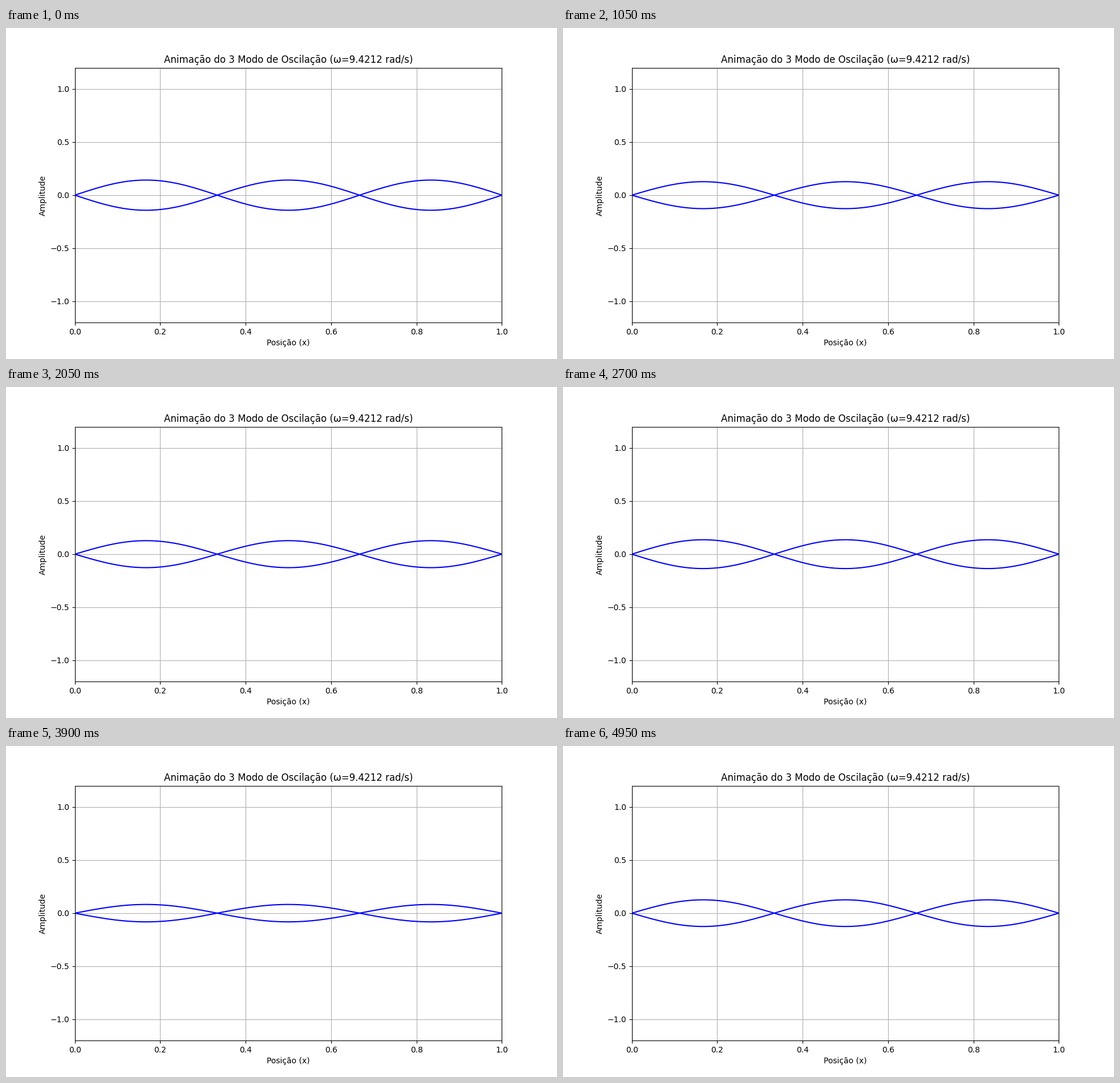
A matplotlib script for the animation above (5000 ms loop, 966 by 580 pixels).

```python
import numpy as np
import matplotlib.pyplot as plt
from matplotlib.animation import FuncAnimation

WIDTH, HEIGHT, DPI = 966, 580, 100
FRAMES, INTERVAL = 100, 50

# Discretised string with fixed ends
MODE = 3
POINTS = 100
SEGMENTS = POINTS - 1

x = np.linspace(0, 1, POINTS)
omega = 2 * SEGMENTS * np.sin(MODE * np.pi / (2 * SEGMENTS))
shape = np.sqrt(2 / SEGMENTS) * np.sin(MODE * np.pi * x)  # unit-norm eigenvector

fig, ax = plt.subplots(figsize=(WIDTH / DPI, HEIGHT / DPI), dpi=DPI)
ax.set_xlim(0, 1)
ax.set_ylim(-1.2, 1.2)
ax.set_title(f"Animação do {MODE} Modo de Oscilação (ω={omega:.4f} rad/s)")
ax.set_xlabel("Posição (x)")
ax.set_ylabel("Amplitude")
ax.grid(True)

upper, = ax.plot(x, shape, "b-")
lower, = ax.plot(x, -shape, "b-")


def update(frame):
    t = frame * INTERVAL / 1000
    y = shape * np.cos(omega * t)
    upper.set_ydata(y)
    lower.set_ydata(-y)
    return upper, lower


anim = FuncAnimation(fig, update, frames=FRAMES, interval=INTERVAL,
                     repeat=True, repeat_delay=0)
plt.show()
```
